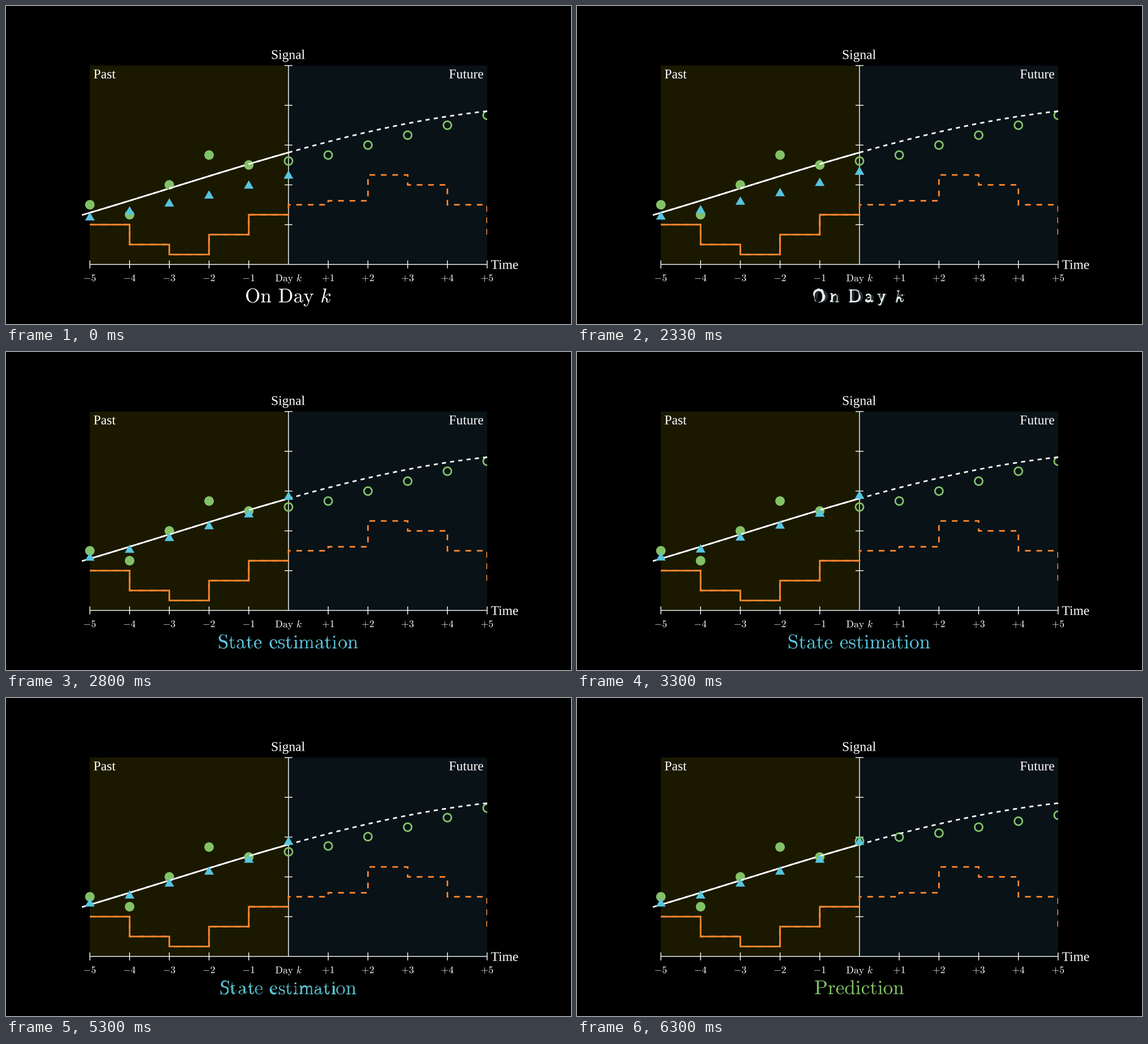
These frames come from a looping animation (998 px wide and 561 px high, 8 s). A matplotlib script:

```python
import numpy as np
import matplotlib.pyplot as plt
from matplotlib.animation import FuncAnimation
from matplotlib.collections import PathCollection
from matplotlib.colors import to_rgb
from matplotlib.patches import Circle, PathPatch, Polygon, Rectangle
from matplotlib.path import Path
from matplotlib.textpath import TextPath
from matplotlib.transforms import Affine2D

plt.rcParams.update({
    "mathtext.fontset": "cm",
    "path.snap": False,
    "path.simplify": False,
    "lines.scale_dashes": False,
})

W, H, DPI = 998, 561, 64
PT = 72 / DPI                      # points per pixel
UNIT, X0, Y0 = 70.17, 499, 455.9   # plot unit and origin in pixels
LEFT, RIGHT, TOP = X0 - 5 * UNIT, X0 + 5 * UNIT, Y0 - 5 * UNIT

WHITE, GREEN, BLUE, ORANGE = "#ffffff", "#83c167", "#58c4dd", "#ff862f"
THICK, THIN = 2.8, 1.4

FRAMES, INTERVAL = 200, 40
STATE_START, PREDICT_START, MORPH_MS = 2000, 5000, 1000

fig = plt.figure(figsize=(W / DPI, H / DPI), dpi=DPI, facecolor="black")
ax = fig.add_axes([0, 0, 1, 1])
ax.set_xlim(0, W)
ax.set_ylim(H, 0)
ax.axis("off")


def px(x):
    return X0 + UNIT * np.asarray(x, float)


def py(y):
    return Y0 - UNIT * np.asarray(y, float)


def smooth(t):
    """Sigmoid easing, scaled to run exactly from 0 to 1."""
    def sig(v):
        return 1 / (1 + np.exp(-v))
    low = sig(-5)
    return float(np.clip((sig(10 * (t - 0.5)) - low) / (1 - 2 * low), 0, 1))


# ---------- drawing helpers ----------

def line(x, y, color=WHITE, width=THICK, z=3, style="-"):
    artist, = ax.plot(x, y, color=color, lw=width * PT, ls=style, zorder=z,
                      solid_capstyle="butt", dash_capstyle="butt",
                      solid_joinstyle="miter", dash_joinstyle="miter")
    return artist


def dashed(x, y, color, z, count=50):
    """Evenly dashed line that starts and ends with a dash."""
    length = np.hypot(np.diff(x), np.diff(y)).sum()
    dash = length / (2 * count - 1) * PT
    artist = line(x, y, color, z=z, style=(0, (dash, dash)))
    artist.set_clip_path(plot_area)


def dot(k, v, filled, z):
    c = Circle((px(k), py(v)), 7, facecolor=GREEN if filled else "none",
               edgecolor=GREEN, lw=THICK * PT, zorder=z)
    ax.add_patch(c)
    c.set_clip_path(clip_right)
    return c


def triangle_points(k, v, r=7):
    x, y = px(k), py(v)
    half, rise = r * np.sqrt(3) / 2, 0.75 * r
    return [(x, y - rise), (x + half, y + rise), (x - half, y + rise)]


def text_path(s, size, x, y, ha=0.5, va=0.0):
    """Outline of s with its ink box anchored at (x, y)."""
    path = TextPath((0, 0), s, size=size, prop={"family": "Liberation Serif"})
    box = path.get_extents()
    dx = x - box.x0 - ha * box.width
    dy = y + box.y1 - va * box.height
    return Affine2D().scale(1, -1).translate(dx, dy).transform_path(path)


def label(*args, **kwargs):
    ax.add_patch(PathPatch(text_path(*args, **kwargs), facecolor=WHITE,
                           edgecolor="none", lw=0, zorder=9))


# ---------- panels and axes ----------

ax.add_patch(Rectangle((LEFT, TOP), 5 * UNIT, 5 * UNIT, fc="#1a1900", lw=0, zorder=0))
ax.add_patch(Rectangle((X0, TOP), 5 * UNIT, 5 * UNIT, fc="#081217", lw=0, zorder=0))
plot_area = Rectangle((LEFT, TOP), 10 * UNIT, 5 * UNIT, transform=ax.transData)
clip_right = Rectangle((0, 0), RIGHT, H, transform=ax.transData)

line([LEFT, RIGHT], [Y0, Y0], width=THIN, z=1)
line([X0, X0], [Y0, TOP], width=THIN, z=1)
for k in range(-5, 6):
    if k:
        line([px(k)] * 2, [Y0 - 7, Y0 + 7], width=THIN, z=1)
    name = f"${k:+d}$" if k else r"$\mathrm{Day}\hspace{0.38}k$"
    label(name, 17.6, px(k), 473.5)
for v in range(1, 6):
    line([X0 - 7, X0 + 7], [py(v)] * 2, width=THIN, z=1)

label("Signal", 23.5, 498.7, 98.5, va=1)
label("Past", 23.5, LEFT + 7, 112.2, ha=0)
label("Future", 23.5, RIGHT - 7, 112.2, ha=1)
label("Time", 23.5, RIGHT + 7, Y0 + 0.3, ha=0, va=0.5)

# ---------- signals ----------


def trend(x):
    return 2.813 + 0.28182 * x - 0.00946 * x**2 - 0.001061 * x**3


xs = np.linspace(-5.2, 0, 80)
line(px(xs), py(trend(xs)), z=2)
xs = np.linspace(-5, 5, 160)
dashed(px(xs), py(trend(xs)), WHITE, 5)

levels = [1, 0.5, 0.25, 0.75, 1.25, 1.5, 1.6, 2.25, 2, 1.5]
step_x = np.append(np.repeat(np.arange(-5, 6), 2)[1:-1], 5)
step_y = np.append(np.repeat(levels, 2), 0.75)
line(px(step_x[:10]), py(step_y[:10]), ORANGE, z=4)
dashed(px(step_x), py(step_y), ORANGE, 4)

for k, v in zip(range(-5, 0), [1.5, 1.25, 2, 2.75, 2.5]):
    dot(k, v, True, 3)

days_ahead = np.arange(6)
forecast = np.array([[2.6, 2.75, 3, 3.25, 3.5, 3.75],
                     [2.9, 3, 3.1, 3.25, 3.4, 3.55]])
rings = [dot(k, v, False, 3) for k, v in zip(days_ahead, forecast[0])]

days_back = np.arange(-5, 1)
estimate = np.array([[1.2, 1.35, 1.55, 1.75, 2, 2.25],
                     [1.35, 1.55, 1.85, 2.15, 2.45, 2.9]])
triangles = []
for k, v in zip(days_back, estimate[0]):
    tri = Polygon(triangle_points(k, v), facecolor=BLUE, edgecolor=BLUE,
                  lw=THICK * PT, joinstyle="miter", zorder=6)
    triangles.append(ax.add_patch(tri))

# ---------- morphing title ----------

SAMPLES = 120
CODES = [Path.MOVETO] + [Path.LINETO] * (SAMPLES - 2) + [Path.CLOSEPOLY]


def split_glyphs(path):
    """Group the outlines of a text into glyphs by horizontal overlap."""
    groups, edge = [], -np.inf
    for poly in sorted(path.to_polygons(), key=lambda p: p[:, 0].min()):
        if poly[:, 0].min() < edge - 1.5:
            groups[-1].append(poly)
        else:
            groups.append([poly])
        edge = max(edge, poly[:, 0].max())
    return groups


def resample(poly):
    at = np.linspace(0, len(poly) - 1, SAMPLES)
    idx = np.arange(len(poly))
    return np.column_stack([np.interp(at, idx, poly[:, c]) for c in (0, 1)])


def outline(glyph, count):
    """Sampled outlines, padded with collapsed ones up to count."""
    parts = [resample(p) for p in glyph]
    parts += [np.tile(parts[-1][-1], (SAMPLES, 1))] * (count - len(parts))
    return np.concatenate(parts)


def spread(glyphs, n):
    """Repeat glyphs to reach n; the repeats are invisible."""
    order = [i * len(glyphs) // n for i in range(n)]
    return [(glyphs[j], float(i == 0 or order[i - 1] != j))
            for i, j in enumerate(order)]


def pair_up(a, b):
    n = max(len(a), len(b))
    pairs = []
    for (ga, oa), (gb, ob) in zip(spread(a, n), spread(b, n)):
        count = max(len(ga), len(gb))
        pairs.append((outline(ga, count), outline(gb, count), oa, ob, CODES * count))
    return pairs


titles = [text_path(s, 35.2, 498.7, 498) for s in (
    r"$\mathrm{On}\hspace{0.38}\mathrm{Day}\hspace{0.38}k$",
    r"$\mathrm{State}\hspace{0.38}\mathrm{estimation}$",
    r"$\mathrm{Prediction}$")]
title_colors = [np.array(to_rgb(c)) for c in (WHITE, BLUE, GREEN)]
glyph_sets = [split_glyphs(p) for p in titles]
morphs = [pair_up(glyph_sets[i], glyph_sets[i + 1]) for i in (0, 1)]

title = PathCollection([titles[0]], edgecolors="none", linewidths=0, zorder=9)
ax.add_collection(title, autolim=False)


def set_title(stage, s):
    """Show title number stage, moved by s towards the next one."""
    if s <= 0 or s >= 1:
        stage += int(s >= 1)
        title.set_paths([titles[stage]])
        title.set_facecolor([(*title_colors[stage], 1)])
        return
    rgb = (1 - s) * title_colors[stage] + s * title_colors[stage + 1]
    paths, colors = [], []
    for a, b, oa, ob, codes in morphs[stage]:
        paths.append(Path((1 - s) * a + s * b, codes))
        colors.append((*rgb, (1 - s) * oa + s * ob))
    title.set_paths(paths)
    title.set_facecolor(colors)


def update(i):
    t = i * INTERVAL + 10
    s1 = smooth((t - STATE_START) / MORPH_MS)
    s2 = smooth((t - PREDICT_START) / MORPH_MS)
    for tri, k, v in zip(triangles, days_back, (1 - s1) * estimate[0] + s1 * estimate[1]):
        tri.set_xy(triangle_points(k, v))
    for ring, k, v in zip(rings, days_ahead, (1 - s2) * forecast[0] + s2 * forecast[1]):
        ring.center = px(k), py(v)
    if t < PREDICT_START:
        set_title(0, s1)
    else:
        set_title(1, s2)
    return [*triangles, *rings, title]


anim = FuncAnimation(fig, update, frames=FRAMES, interval=INTERVAL,
                     repeat=True, blit=False, cache_frame_data=False)
plt.show()
```
